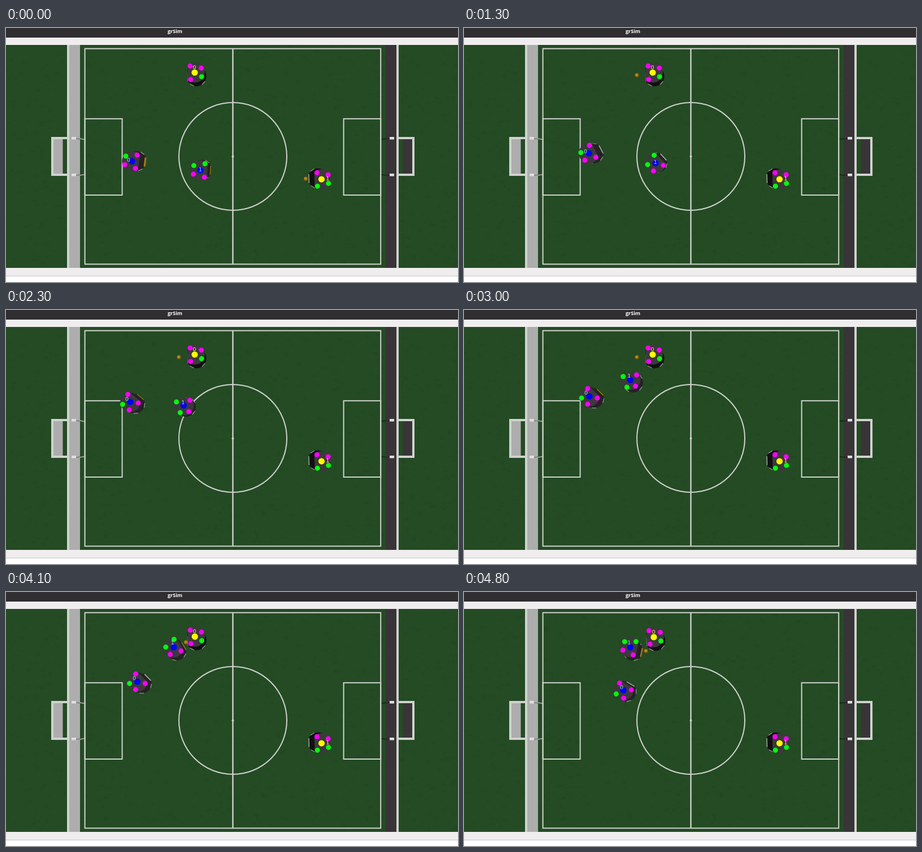
Animation, 800 px wide and 450 px high, one loop 4900 ms. Source, as an HTML page with a canvas:

```html
<!DOCTYPE html>
<html lang="en">
<head>
<meta charset="utf-8">
<title>grSim</title>
<style>
html, body { margin: 0; width: 100%; height: 100%; overflow: hidden; background: #fff; }
canvas { display: block; width: 800px; height: 450px; }
</style>
</head>
<body>
<canvas id="stage" width="800" height="450"></canvas>
<script>
const ctx = document.getElementById('stage').getContext('2d');
const LOOP = 4900, STEP = 100, RAD = Math.PI / 180;
const CENTER = { x: 401.5, y: 227.5 };
const LINE = '#d0d2cf', MAGENTA = '#fb00fb', GREEN = '#04fb0c';
const BLUE = { dot: '#0000fc', label: '#9bd6f5', wall: '#242224', kicker: '#c4c4c0' };
const YELLOW = { dot: '#fffa00', label: '#f4ec70', wall: '#111', kicker: '#b8b8b4' };

const clamp = (v, lo, hi) => Math.min(hi, Math.max(lo, v));

// Smooth progress from 0 to 1 between two times
function ease(t, from, to) {
  const u = clamp((t - from) / (to - from), 0, 1);
  return u * u * (3 - 2 * u);
}

// Smooth curve through [time, x, y] points, holding at both ends
function follow(points, t) {
  const last = points.length - 1;
  t = clamp(t, points[0][0], points[last][0]);
  const i = Math.max(0, points.findIndex(p => p[0] >= t) - 1);
  const slope = (k, c) => {
    const j = clamp(k, 0, last - 1);
    return (points[j + 1][c] - points[j][c]) / (points[j + 1][0] - points[j][0]);
  };
  // Harmonic mean of neighbouring slopes keeps the curve from overshooting
  const tangent = (k, c) => {
    const a = slope(k - 1, c), b = slope(k, c);
    return a * b > 0 ? 2 * a * b / (a + b) : 0;
  };
  const from = points[i], to = points[i + 1];
  const span = to[0] - from[0], u = (t - from[0]) / span, v = 1 - u;
  return [1, 2].map(c => from[c] * (1 + 2 * u) * v * v + to[c] * u * u * (3 - 2 * u)
    + span * u * v * (v * tangent(i, c) - u * tangent(i + 1, c)));
}

const keeperPath = [
  [900, 223, 236], [1300, 221, 222], [2300, 220, 163],
  [3000, 222, 153], [4100, 232.5, 159], [4800, 282, 174]
];
const strikerPath = [
  [900, 344, 252], [1300, 339, 239.5], [2300, 314.5, 169], [3000, 294.5, 124],
  [3800, 305, 105], [4100, 297, 98], [4800, 294.5, 98]
];
const ballPath = [[3800, 306, 83.5], [4100, 318.5, 89], [4800, 322, 104.5]];

const robots = [
  {
    id: 0, team: BLUE,
    at: t => follow(keeperPath, t),
    heading: t => 7 - 57 * ease(t, 900, 1600) + 5 * ease(t, 2300, 3000) - 15 * ease(t, 4100, 4800),
    lit: t => t < 900 || (t > 1800 && t < 3800)
  },
  {
    id: 1, team: BLUE,
    at: t => follow(strikerPath, t),
    heading: t => 3 - 100 * ease(t, 900, 1750) + 109 * ease(t, 3700, 4400),
    lit: t => t < 900 || t > 3900
  },
  {
    id: 0, team: YELLOW,
    at: t => [334 + 2 * ease(t, 3900, 4800), 79 + ease(t, 3900, 4800)],
    heading: t => 178 - 2 * ease(t, 3900, 4800),
    lit: () => false
  },
  { id: 1, team: YELLOW, at: () => [558.5, 268], heading: () => 178, lit: () => false }
];

function box(c, color, x, y, w, h) {
  c.fillStyle = color;
  c.fillRect(x, y, w, h);
}

function disc(c, color, x, y, r) {
  c.fillStyle = color;
  c.beginPath();
  c.arc(x, y, r, 0, 7);
  c.fill();
}

function line(c, color, width, x1, y1, x2, y2) {
  c.strokeStyle = color;
  c.lineWidth = width;
  c.beginPath();
  c.moveTo(x1, y1);
  c.lineTo(x2, y2);
  c.stroke();
}

function drawTurf(c) {
  box(c, '#244b24', 0, 30, 800, 395);
  let seed = 7;
  const random = () => (seed = seed * 16807 % 2147483647) / 2147483647;
  for (let i = 0; i < 2000; i++) {
    const color = random() < 0.5 ? 'rgba(10,40,10,.04)' : 'rgba(70,110,60,.035)';
    box(c, color, random() * 800, 30 + random() * 390, 2 + random() * 6, 2 + random() * 4);
  }
}

function drawGoal(c, left) {
  const mirror = x => left ? x : 803 - x;
  const bar = (color, x, y, w, h) => box(c, color, mirror(left ? x : x + w), y, w, h);
  const wall = left ? '#adadad' : '#383438';
  bar(wall, 112, 30, 19, 395);
  bar(LINE, 108, 30, 4, 395);
  bar(wall, 84, 197, 16.5, 61);
  bar(LINE, 80, 193, 4, 69);
  for (const [y, drop] of [[193, 1.5], [258, -1.5]]) {
    bar(LINE, 80, y, 30, 4);
    bar('#dedede', 116, y, 8, 4.5);
    line(c, left ? '#777a77' : '#282828', 1.6, mirror(124), y + 3, mirror(131), y + 3 + drop / 2);
    line(c, left ? '#969a96' : '#222622', 2, mirror(131), y + 3, mirror(139), y + 3 + drop);
  }
}

function drawField(c) {
  drawTurf(c);
  drawGoal(c, true);
  drawGoal(c, false);
  c.strokeStyle = LINE;
  c.lineWidth = 2;
  c.strokeRect(139.6, 36.6, 523.6, 381.8);
  c.strokeRect(139.6, 160.8, 66, 135.2);
  c.strokeRect(597.6, 160.8, 65.6, 135.2);
  c.beginPath();
  c.arc(CENTER.x, CENTER.y, 95.5, 0, 7);
  c.stroke();
  line(c, LINE, 2.4, CENTER.x, 37, CENTER.x, 418);
  disc(c, LINE, CENTER.x, CENTER.y, 2);
}

function drawWindow(c) {
  box(c, '#fff', 0, 0, 800, 450);
  box(c, '#312e31', 0, 0, 800, 17);
  box(c, '#f0edef', 0, 17, 800, 13);
  box(c, '#f0edef', 0, 425, 800, 14);
  box(c, '#c9c6c8', 0, 439, 800, 1);
  c.font = 'bold 9.2px "Open Sans", "Noto Sans", sans-serif';
  c.textAlign = 'center';
  c.fillStyle = '#fff';
  c.fillText('grSim', 299, 9);
}

const backdrop = document.createElement('canvas');
backdrop.width = 800;
backdrop.height = 450;
const back = backdrop.getContext('2d');
drawWindow(back);
drawField(back);

// Disc with a flat front towards +x
function flatDisc(color, r, front) {
  const a = Math.acos(front / r);
  ctx.fillStyle = color;
  ctx.beginPath();
  ctx.arc(0, 0, r, a, 2 * Math.PI - a);
  ctx.fill();
}

function drawRobot({ id, team, at, heading, lit }, t) {
  const [x, y] = at(t), angle = heading(t) * RAD;
  const dx = x - CENTER.x, dy = y - CENTER.y;
  // Lower layers lean towards the middle of the view
  const layer = (depth, paint) => {
    ctx.save();
    ctx.translate(x - dx * depth, y - dy * depth);
    ctx.rotate(angle);
    paint();
    ctx.restore();
  };

  layer(0.045, () => {
    flatDisc(team.wall, 17.5, 15.5);
    for (const wheel of [60, 135, 225, 300]) {
      ctx.save();
      ctx.rotate(wheel * RAD);
      line(ctx, '#9c9c9c', 1.2, 17.2, -4, 17.2, 4);
      ctx.restore();
    }
    const frontSeen = -0.018 * (dx * Math.cos(angle) + dy * Math.sin(angle));
    const width = lit(t) ? clamp(frontSeen, 1.2, 3.2) : 1.3;
    line(ctx, lit(t) ? '#a67a14' : team.kicker, width, 15.2, -8, 15.2, 8);
  });
  layer(0.02, () => flatDisc(team.wall, 17.6, 14));
  layer(0, () => {
    flatDisc('#3b393b', 17.8, 12.5);
    // Front left, front right, back right, back left
    [-57.4, 57.4, 147.4, -147.4].forEach((a, i) => {
      const color = i === 3 || (id === 1 && i === 0) ? GREEN : MAGENTA;
      disc(ctx, color, 14.2 * Math.cos(a * RAD), 14.2 * Math.sin(a * RAD), 4.5);
    });
    disc(ctx, team.dot, 0, 0, 5.6);
  });

  ctx.font = '9.5px "DejaVu Sans", sans-serif';
  ctx.textAlign = 'center';
  ctx.fillStyle = team.label;
  ctx.fillText(id, x + 3 + dx * 0.05, y + 0.5 + dy * 0.045);
}

function drawBall(x, y) {
  disc(ctx, '#8a610c', x, y, 3.6);
  disc(ctx, '#c08814', x - 0.3, y - 0.4, 2.4);
}

function drawMenu() {
  box(ctx, '#fcfcfc', 306, 85.5, 145, 76);
  box(ctx, '#3c93c6', 306, 85.5, 145, 15.5);
  ctx.font = '9px "Noto Sans", "Open Sans", sans-serif';
  ctx.textAlign = 'left';
  // An ampersand precedes the underlined letter
  ['Locate &ball here', 'Locate current &robot here', '&Camera', '&Blue Robots', '&Yellow Robots']
    .forEach((item, i) => {
      const y = 96.5 + i * 15.3, label = item.replace('&', ''), at = item.indexOf('&');
      const color = i ? '#000' : '#fff';
      ctx.fillStyle = color;
      ctx.fillText(label, 323, y);
      const start = ctx.measureText(label.slice(0, at)).width;
      box(ctx, color, 323 + start, Math.round(y + 1), ctx.measureText(label[at]).width, 0.8);
      if (i < 2) return;
      ctx.beginPath();
      ctx.moveTo(444.5, y - 5.2);
      ctx.lineTo(447.3, y - 3.2);
      ctx.lineTo(444.5, y - 1.2);
      ctx.fill();
    });
}

const pointer = new Path2D('M0 0V9L2 7.2 3.6 10.4 5 9.7 3.6 6.6 6.4 6.4Z');

function drawCursor(x, y) {
  ctx.save();
  ctx.translate(x, y);
  ctx.fillStyle = '#111';
  ctx.fill(pointer);
  ctx.strokeStyle = '#ddd';
  ctx.lineWidth = 0.7;
  ctx.stroke(pointer);
  ctx.restore();
}

function draw(t) {
  ctx.drawImage(backdrop, 0, 0);
  if (t < 800) drawBall(530.5, 267);
  else drawBall(...follow(ballPath, t));
  for (const robot of robots) drawRobot(robot, t);
  if (t >= 500 && t < 800) drawMenu();
  if (t >= 300 && t < 800) {
    const u = ease(t, 200, 500);
    drawCursor(279 + 32 * u, 76 + 11 * u);
  }
}

const start = performance.now();
function tick(now) {
  const t = Math.max(0, now - start) % LOOP;
  draw(Math.floor(t / STEP) * STEP);
  requestAnimationFrame(tick);
}
draw(0);
requestAnimationFrame(tick);
</script>
</body>
</html>
```
